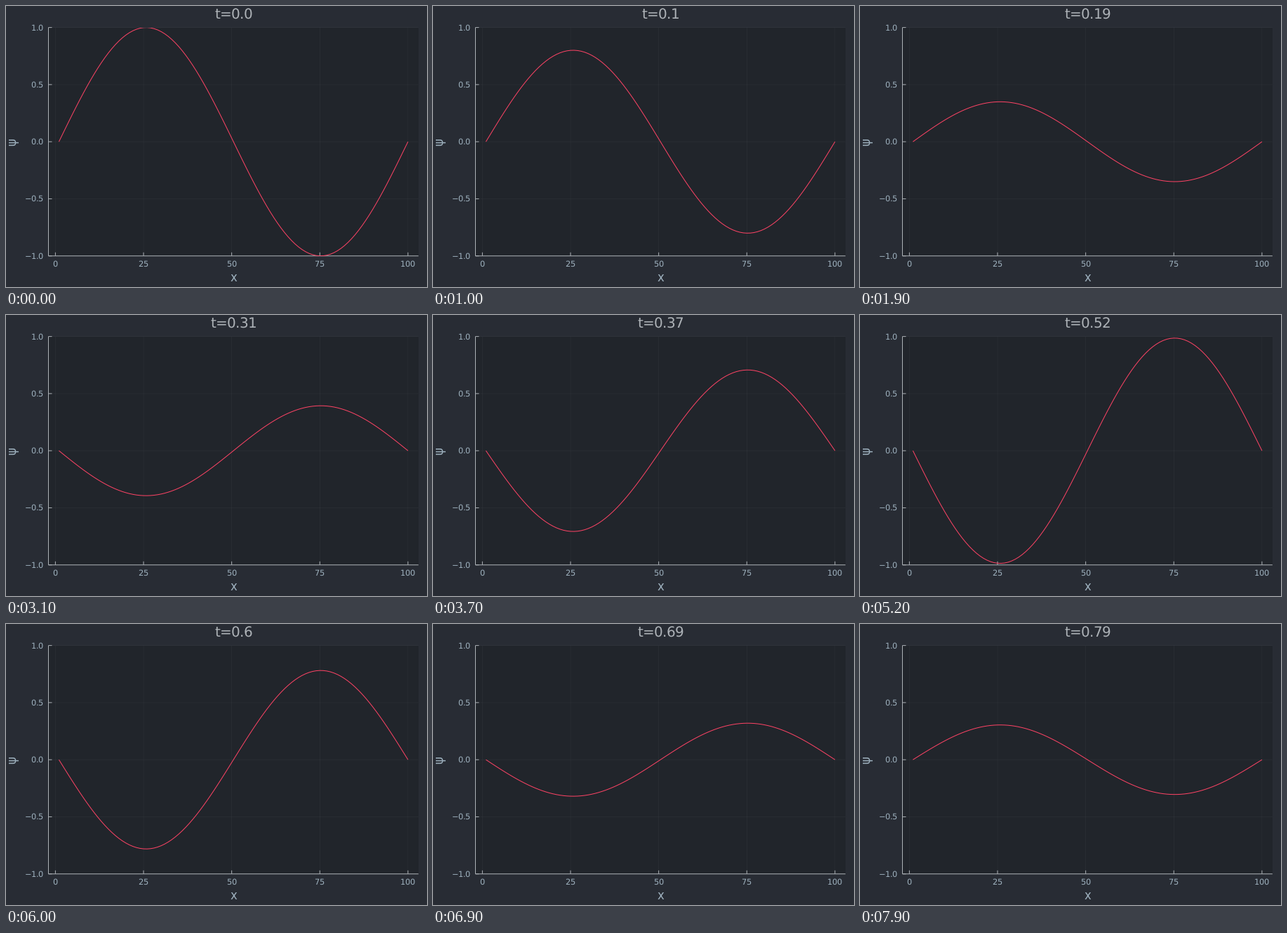
Write a matplotlib script that moves like this. It is 600 px wide and 400 px high and loops after 8 s.

```python
import numpy as np
import matplotlib.pyplot as plt
from matplotlib.animation import FuncAnimation
from matplotlib.patches import PathPatch, Rectangle
from matplotlib.path import Path
from matplotlib.textpath import TextPath

W, H, DPI = 600, 400, 100
FRAMES, STEP_MS = 80, 100
BG, PANEL = "#282C34", "#21252B"
FG, LABEL, CURVE = "#ADB2B7", "#9EB1BE", "#FE4365"
LEFT, RIGHT, TOP, BOTTOM = 60.5, 587.8, 30.6, 355.75
TICK_SIZE, GUIDE_SIZE, TITLE_SIZE = 11.4, 16.5, 20
OMEGA, PHASE = 2 * np.pi * 100 / 99, 0.0078

plt.rcParams["font.family"] = "DejaVu Sans"


def px(n):
    """Pixels to points."""
    return n * 72 / DPI


def sx(x):
    return LEFT + (x + 1.97) / 104.94 * (RIGHT - LEFT)


def sy(y):
    return TOP + (1 - y) / 2 * (BOTTOM - TOP)


fig = plt.figure(figsize=(W / DPI, H / DPI), dpi=DPI, facecolor=BG)
ax = fig.add_axes([0, 0, 1, 1])
ax.set_xlim(0, W)
ax.set_ylim(H, 0)
ax.axis("off")


def line(xs, ys, color=FG, width=1.0, **kw):
    return ax.plot(xs, ys, color=color, lw=px(width), snap=False,
                   solid_capstyle="butt", **kw)[0]


def right_edge(text, size):
    return TextPath((0, 0), text, size=size).get_extents().x1


def advance(ch, size):
    """Advance width of a character, cut to whole pixels."""
    return int(right_edge(ch + "0", size) - right_edge("0", size))


def text_path(x, y, text, size, align=0.5):
    """Outline of a text set on whole pixels, with its baseline at y."""
    steps = [advance(ch, size) for ch in text]
    pen = round(x - align * sum(steps))
    glyphs = []
    for ch, step in zip(text, steps):
        glyph = TextPath((0, 0), ch, size=size)
        glyphs.append(Path(glyph.vertices * [1, -1] + [pen, y], glyph.codes))
        pen += step
    return Path.make_compound_path(*glyphs)


def label(*args, color=LABEL, **kw):
    return ax.add_patch(PathPatch(text_path(*args, **kw), fc=color, ec="none"))


panel = Rectangle((LEFT, TOP), RIGHT - LEFT, BOTTOM - TOP, fc=PANEL, ec="none")
ax.add_patch(panel)

for v in range(0, 101, 25):
    x = sx(v)
    line([x, x], [TOP, BOTTOM], width=0.5, alpha=0.1)
    line([x, x], [BOTTOM, BOTTOM - 5])
    label(x, 371, str(v), TICK_SIZE)

for v in np.arange(-1, 1.1, 0.5):
    y = sy(v)
    line([LEFT, RIGHT], [y, y], width=0.5, alpha=0.1)
    line([LEFT, LEFT + 5], [y, y])
    label(53, round(y + 4), f"{v:.1f}".replace("-", "\u2212"), TICK_SIZE, align=1)

line([LEFT, LEFT], [TOP, BOTTOM])
line([LEFT, RIGHT], [BOTTOM, BOTTOM])

guide = dict(fontsize=px(GUIDE_SIZE), color=LABEL, ha="center")
ax.text(324.3, 392, "x", va="baseline", **guide)
ax.text(9.5, 193.3, "\u03c8", va="center", rotation=90, **guide)
title = label(324.3, 18, "t=0.0", TITLE_SIZE, color=FG)

xs = np.arange(1, 101)
mode = np.sin(2 * np.pi * (xs - 1) / 99)
wave = line(sx(xs), sy(mode), CURVE, zorder=3)
wave.set_clip_path(panel)


def update(i):
    t = i / 100
    wave.set_ydata(sy(mode * np.cos(OMEGA * t + PHASE)))
    title.set_path(text_path(324.3, 18, f"t={t}", TITLE_SIZE))
    return wave, title


anim = FuncAnimation(fig, update, frames=FRAMES, interval=STEP_MS,
                     repeat=True, repeat_delay=0)
plt.show()
```
